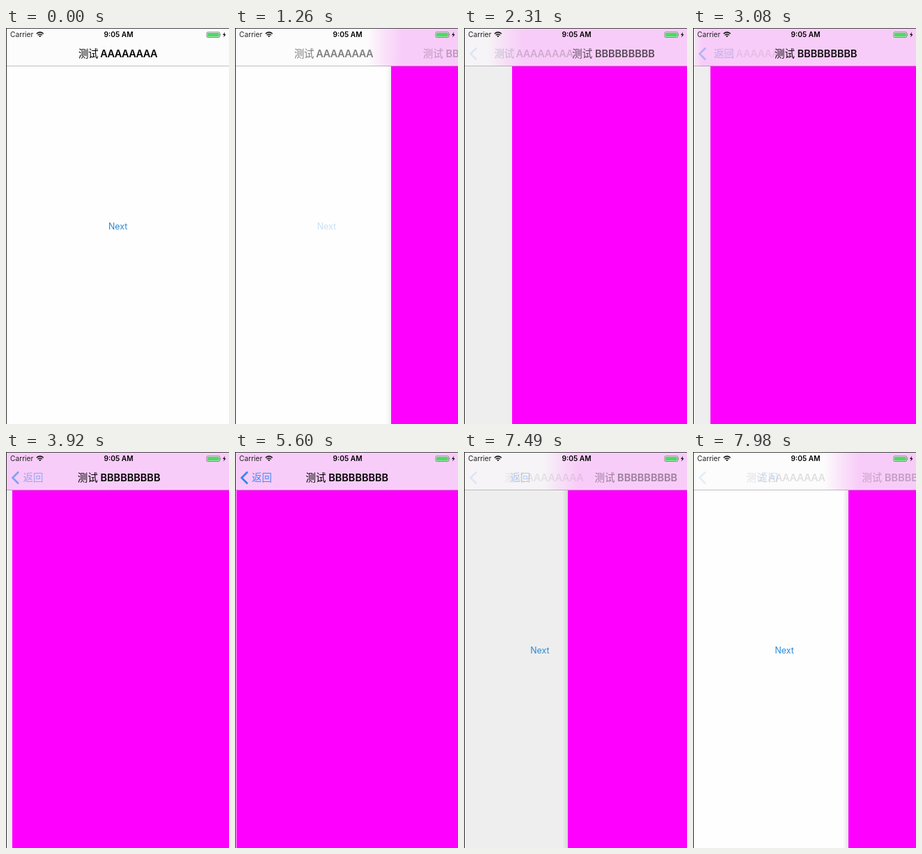
These frames come from a looping animation (320 px wide and 568 px high, 8000 ms). An HTML page:

```html
<!DOCTYPE html>
<html lang="zh-CN">
<head>
<meta charset="utf-8">
<title>Navigation transition</title>
<style>
  html, body { margin: 0; width: 100%; height: 100%; overflow: hidden; background: #fff; }
  svg { display: block; width: 100vw; height: 100vh; }
  text { font-family: Inter, "Noto Sans CJK SC", "Noto Sans CJK", sans-serif; white-space: pre; }
  .title { font-size: 14.5px; font-weight: 600; }
  .title .han { font-weight: 500; }
  .status { font-size: 10.2px; }
</style>
</head>
<body>
<svg viewBox="0 0 320 568">
  <defs>
    <linearGradient id="blur" gradientUnits="userSpaceOnUse" y1="0" y2="0">
      <stop offset="0" stop-color="#f8ccf8" stop-opacity="0"/>
      <stop offset=".5" stop-color="#f8ccf8" stop-opacity=".55"/>
      <stop offset="1" stop-color="#f8ccf8"/>
    </linearGradient>
    <linearGradient id="edge">
      <stop offset="0" stop-opacity="0"/>
      <stop offset="1" stop-opacity=".1"/>
    </linearGradient>
  </defs>

  <rect id="back" width="320" height="568"/>
  <text id="next" x="147" y="289.3" font-size="12.4" fill="#2a8ad4">Next</text>
  <g id="page">
    <rect id="shadow" x="-8" y="55" width="8" height="513" fill="url(#edge)"/>
    <rect y="55" width="322" height="513" fill="#fe00fe"/>
  </g>

  <rect id="bar" width="320" height="55"/>
  <rect id="tint" width="320" height="55" fill="url(#blur)"/>
  <rect y="54" width="320" height="1" fill-opacity=".24"/>

  <text id="titleA" class="title" x="104" y="42" letter-spacing="-.5"><tspan class="han">测试</tspan> AAAAAAAA</text>
  <text id="titleB" class="title" x="101.5" y="42"><tspan class="han">测试</tspan> BBBBBBBBB</text>
  <path id="chevron" d="M18 28.5 9.5 37 18 45.5" fill="none" stroke="#2f86f2" stroke-width="2.6"/>
  <text id="label" x="24" y="42" font-size="14.5" fill="#4a8cf0">返回</text>

  <text class="status" x="6" y="13.3" fill="#222">Carrier</text>
  <g fill="none" stroke="#111" stroke-width="1.5">
    <path d="M43.8 8.3Q48.8 4 53.8 8.3M45.6 10.3Q48.8 7.6 52 10.3"/>
    <path d="M48.8 13.2 47.2 11.4Q48.8 10.2 50.4 11.4Z" fill="#111" stroke="none"/>
  </g>
  <text class="status" x="161.5" y="13.3" font-weight="600" text-anchor="middle">9:05 AM</text>
  <rect x="288" y="5.9" width="18.8" height="7.6" rx="1.4" fill="#fff" stroke="#555" stroke-width=".7"/>
  <rect x="289" y="6.9" width="16.8" height="5.6" rx=".6" fill="#4cd964"/>
  <path d="M307.6 8.3q1.4 1.4 0 2.8z" fill="#444"/>
  <path d="M314.2 5.8 311 10.1h2l-.9 3.5 3.5-4.5h-2.1z" fill="#111"/>

  <rect width="320" height="1" fill="#444"/>
  <rect width="1" height="568" fill="#2a2a2a"/>
</svg>
<script>
const LOOP = 8000, STEP = 70;
const PUSH = 618, SETTLED = 5950, POP = 6592, OMEGA = 1.73;

const el = Object.fromEntries([...document.querySelectorAll('[id]')].map(e => [e.id, e]));
const clamp = v => Math.min(1, Math.max(0, v));
const set = (e, attrs) => { for (const k in attrs) e.setAttribute(k, attrs[k]); };
const place = (e, dx, alpha) => set(e, { transform: `translate(${dx} 0)`, opacity: clamp(alpha) });

// Critically damped spring: 1 at the start, falling to 0.
const spring = s => (1 + OMEGA * s) * Math.exp(-OMEGA * s);
const fade = s => Math.exp(-1.1 * s);
const easeOut = (s, duration) => (1 - clamp(s / duration)) ** 3;

function draw(now) {
  const t = Math.floor((now % LOOP) / STEP + 1e-6) * STEP;
  const popping = t >= POP;
  const s = Math.max(0, t - (popping ? POP : PUSH)) / 1000;
  const away = popping ? 1 - spring(s) : t >= SETTLED ? 0 : spring(s);
  const shown = 1 - away;
  const x = 1 + 320 * away;
  const dimmed = shown > .4;

  set(el.back, { fill: dimmed ? '#eee' : '#fefefe' });
  set(el.bar, { fill: dimmed ? '#f6f4f6' : '#fcfcfc' });
  place(el.page, away > 0 ? Math.ceil(x) : x, shown > 0 ? 1 : 0);
  set(el.shadow, { opacity: popping ? 1 : away ** 1.5 });
  place(el.next, -96 * shown, popping || t < PUSH ? 1 : .2 + .08 * s);

  // The blurred colour reaches the left end of the bar before the page does.
  const spread = clamp((x - 12) / 40);
  const blurEnd = (x + 17) * spread;
  set(el.blur, { x1: blurEnd - 51 * spread - .01, x2: blurEnd });
  set(el.tint, { opacity: clamp(shown * 20) });

  if (popping) {
    const slide = away ** 1.21;
    place(el.titleA, -80 * shown ** .91, .08 * s);
    place(el.titleB, 220 * slide, fade(s));
    place(el.label, 108 * slide, fade(s));
    place(el.chevron, 0, Math.max(.12, Math.exp(-3.3 * s)));
  } else {
    const slide = easeOut(s, 3.96);
    const backAlpha = .3 * (s - 1.29);
    place(el.titleA, -80.8 * shown ** 1.22, s > 2.6 ? 0 : fade(s));
    place(el.titleB, 286 * slide, .381 * s);
    place(el.label, 108 * slide, backAlpha - .05);
    place(el.chevron, 0, backAlpha);
  }
}

const start = performance.now();
function tick() {
  draw(performance.now() - start);
  requestAnimationFrame(tick);
}
tick();
</script>
</body>
</html>
```
